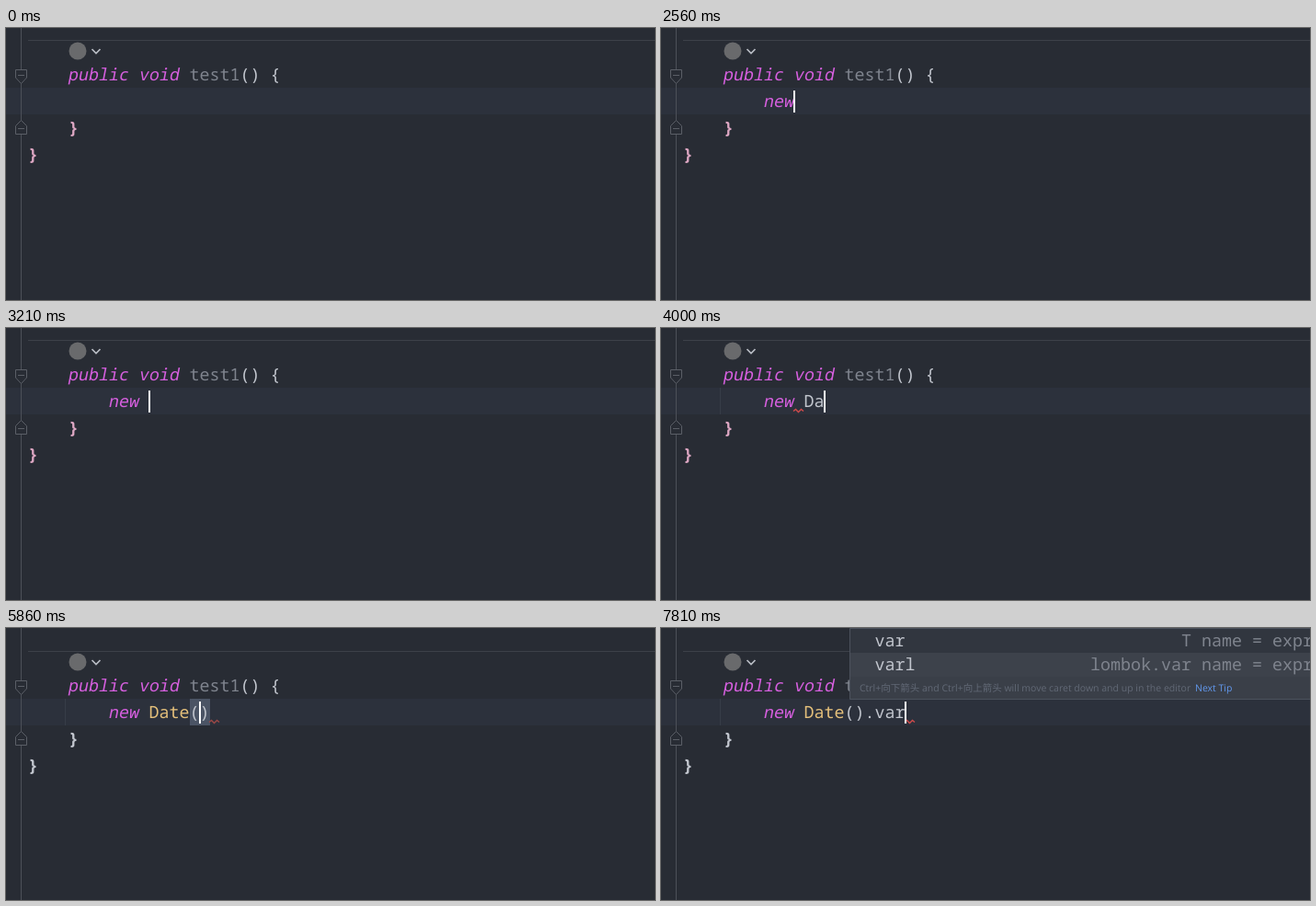
Write an HTML page that moves like this. It is 706x296 px and loops after 8000 ms.

```html
<!DOCTYPE html>
<html lang="en">
<head>
<meta charset="utf-8">
<title>Code completion</title>
<style>
  html, body { margin: 0; width: 100%; height: 100%; overflow: hidden; background: #282c34; }
  svg { display: block; width: 706px; height: 296px; }
  text { font: 500 18.3333px "Noto Sans Mono", monospace; white-space: pre; text-rendering: geometricPrecision; }
  .brace { font-weight: 600; }
  .tip { font: 10.5px "Open Sans", "Noto Sans CJK SC", "Noto Sans CJK", sans-serif; }
  .icon { font: bold 10px "Open Sans", sans-serif; }
</style>
</head>
<body>
<svg viewBox="0 0 706 296">
  <g id="scene"></g>
  <path id="pointer" d="M2.5 .5h3l1 1 1-1h3M6.5 1v17M2.5 18.5h3l1-1 1 1h3" fill="none" stroke="#c4c8d0"/>
</svg>
<script>
const LOOP = 8000;
const C = {
  bg: '#282c34', row: '#2c313c', rule: '#3d4149', fold: '#5b5f67',
  keyword: '#d55fde', plain: '#c2c6ce', unused: '#7f848e', type: '#e5c07b',
  popup: '#31363f', bar: '#3a3f48', picked: '#3d424b', edge: '#4c525d', hint: '#626976',
  blue: '#4298dc', link: '#6299ee', red: '#d04b4b', dimRed: '#9c4846'
};

const TIPS = {
  move: ['Ctrl+向下箭头 and Ctrl+向上箭头 will move caret down and up in the editor', 365],
  insert: ['Press Enter to insert. Tab to replace', 180]
};

const POPUPS = {
  keyword: {
    col: 8, top: 94, bottom: 300, base: 115, picked: 0, match: 3,
    rows: [['new'], ['newInstance', 'Class'], ['newArray', 'Array'], ['newLine', 'BufferedWriter'],
      ['NetworkInterface', 'java.net'], ['NetworkChannel', 'java.nio.channels'], ['newProxyInstance', 'Proxy']]
  },
  date: {
    col: 12, top: -1, bottom: 66, base: 21, picked: 0, icons: true,
    rows: [['DateTimeAtProcessing', 'javax.print.attribute.standard'], ['DateTimeSyntax', 'javax.print.attribute']]
  },
  postfix: {
    col: 19, top: 0, bottom: 78, base: 20, picked: 1, match: 0, right: 709,
    rows: [['var', 'T name = expr'], ['varl', 'lombok.var name = expr']]
  }
};

// Each step changes only the listed parts of the editor.
const steps = [
  [0, { kw: '', name: '', tail: '', nameColor: C.plain, brace: '#dca6c2', caret: 0, wave: 0, waveColor: C.red,
        dy: 0, popup: '', tip: '', marker: false, parens: false, bulb: false }],
  [1220, { caret: 8 }],
  [1760, { caret: 0 }],
  [2290, { kw: 'n', caret: 9 }],
  [2420, { kw: 'ne', caret: 10 }],
  [2560, { kw: 'new', caret: 11 }],
  [2620, { popup: 'keyword' }],
  [3210, { popup: '', caret: 12 }],
  [3540, { name: 'D', caret: 13 }],
  [3670, { wave: 11 }],
  [4000, { name: 'Da', caret: 14 }],
  [4070, { name: 'Dat', caret: 15, popup: 'date', tip: 'move' }],
  [4140, { name: 'Date', caret: 16 }],
  [4340, { tip: 'insert' }],
  [4540, { marker: true }],
  [4800, { caret: 0 }],
  [5340, { popup: '', tail: '()', caret: 17 }],
  [5400, { dy: 12, brace: C.plain }],
  [5470, { nameColor: C.type }],
  [5540, { parens: true }],
  [5860, { wave: 18, waveColor: C.dimRed }],
  [6400, { caret: 18 }],
  [7210, { bulb: true }],
  [7330, { bulb: false, parens: false, tail: '().', caret: 19, wave: 19, waveColor: C.red }],
  [7470, { tail: '().v', caret: 20, wave: 20 }],
  [7540, { popup: 'postfix', tip: 'move' }],
  [7740, { tail: '().va', caret: 21, wave: 21 }],
  [7810, { tail: '().var', caret: 22, wave: 22 }]
];

const colX = col => 23 + 11 * col;
const textX = col => colX(col) + .5;
const rect = (x, y, w, h, fill) => `<rect x="${x}" y="${y}" width="${w}" height="${h}" fill="${fill}"/>`;
const line = (d, color, width = 1, fill = 'none') =>
  `<path d="${d}" fill="${fill}" stroke="${color}" stroke-width="${width}"/>`;
const text = (x, y, s, fill, cls = '') => `<text x="${x}" y="${y}" fill="${fill}" class="${cls}">${s}</text>`;
const italic = (x, y, s) => `<g transform="translate(${x} ${y}) skewX(-11)">${text(0, 0, s, C.keyword)}</g>`;
const wave = (x, y, color) => line(`M${x} ${y}l2.5 -2 3 3 3 -3 2.5 2`, color, 1.4);

function classIcon(x, y, marker) {
  return `<circle cx="${x}" cy="${y}" r="6.5" fill="#3d8fae"/>` + text(x - 3.3, y + 3.6, 'C', '#28404c', 'icon') +
    (marker ? `<path d="M${x - 7} ${y - 7}v4l3.5 -2z" fill="#8796a0"/>` : '');
}

function popup(s) {
  const p = POPUPS[s.popup], tx = colX(p.col), left = tx - 27, barTop = p.bottom - 25;
  let out = rect(left, p.top, 706 - left, p.bottom - p.top, C.popup);
  p.rows.forEach(([name, info], i) => {
    const y = p.base + 26 * i;
    const match = p.match ?? s.name.length;
    if (i === p.picked) out += rect(left, y - 19, 706 - left, 26, C.picked);
    if (p.icons) out += classIcon(142.5, y - 6, s.marker);
    out += text(tx + .5, y, `<tspan fill="${C.blue}">${name.slice(0, match)}</tspan>${name.slice(match)}`, C.plain);
    if (info) {
      const x = p.right ? p.right - 11 * info.length : tx + 11 * (name.length + 1);
      out += text(x, y, info, C.unused);
    }
  });
  if (s.tip) {
    const [tip, linkX] = TIPS[s.tip];
    out += rect(left, barTop, 706 - left, 25, C.bar) +
      text(left + 11, barTop + 16, tip, C.hint, 'tip') +
      text(left + 11 + linkX, barTop + 16, 'Next Tip', C.link, 'tip');
  }
  return out + line(`M706 ${p.bottom - .5}H${left + .5}V${p.top + .5}H706`, C.edge);
}

function editor(s) {
  let out = rect(0, 65, 706, 29, C.row) +
    line('M24 13.5H706', C.rule) +
    '<circle cx="78" cy="25" r="9.5" fill="#696a6c"/>' +
    line('M93.5 23l4.5 4.5 4.5 -4.5', '#b9bdc5', 1.7) +
    line('M16.5 -12V296', '#4c5058') +
    line('M10.5 45.5h12v8.5l-6 6.5 -6 -6.5zM13 51.5h7', C.fold, 1, C.bg) +
    line('M10.5 115.5h12v-9l-6 -6 -6 6zM13 109.5h7', C.fold, 1, C.bg) +
    italic(colX(4), 57, 'public void') +
    text(textX(16), 57, 'test1', C.unused) + text(textX(21), 57, '() {', C.plain) +
    text(colX(4) + 1, 115, '}', s.brace, 'brace') + text(colX(0) + 1, 144, '}', s.brace, 'brace');
  if (s.name) out += line('M64.5 65V94', '#373d48');
  if (s.parens) out += rect(200, 65, 22, 29, '#4b5465');
  out += s.kw === 'new' ? italic(colX(8), 86, s.kw) : text(textX(8), 86, s.kw, C.plain);
  out += text(textX(12), 86, s.name, s.nameColor) + text(textX(12 + s.name.length), 86, s.tail, C.plain);
  if (s.wave) out += wave(colX(s.wave), 90.5, s.waveColor);
  if (s.bulb) {
    out += '<circle cx="38" cy="74.5" r="5.2" fill="#f2a93b"/>' +
      rect(35.5, 77, 5, 3, '#f2a93b') + rect(35.5, 81, 5, 2, '#a9adb5');
  }
  if (s.caret) out += rect(colX(s.caret), 68, 2, 24, '#fff');
  return `<g transform="translate(0 ${s.dy})">${out}</g>` + (s.popup ? popup(s) : '');
}

let state = {};
const scenes = steps.map(([, change]) => editor(state = { ...state, ...change }));

const scene = document.getElementById('scene');
const pointer = document.getElementById('pointer');
const start = performance.now();
let shown = -1;

function movePointer(t) {
  pointer.style.display = t >= 390 && t < 2290 ? '' : 'none';
  const k = Math.min(1, Math.max(0, (t - 390) / 830));
  const ease = k * k * (3 - 2 * k);
  pointer.setAttribute('transform', `translate(${Math.round(608 - 283 * ease)} ${Math.round(269 - 191 * ease)})`);
}

function frame() {
  const t = (performance.now() - start) % LOOP;
  let i = steps.length - 1;
  while (steps[i][0] > t) i--;
  if (i !== shown) scene.innerHTML = scenes[shown = i];
  movePointer(t);
  requestAnimationFrame(frame);
}
frame();
</script>
</body>
</html>
```
